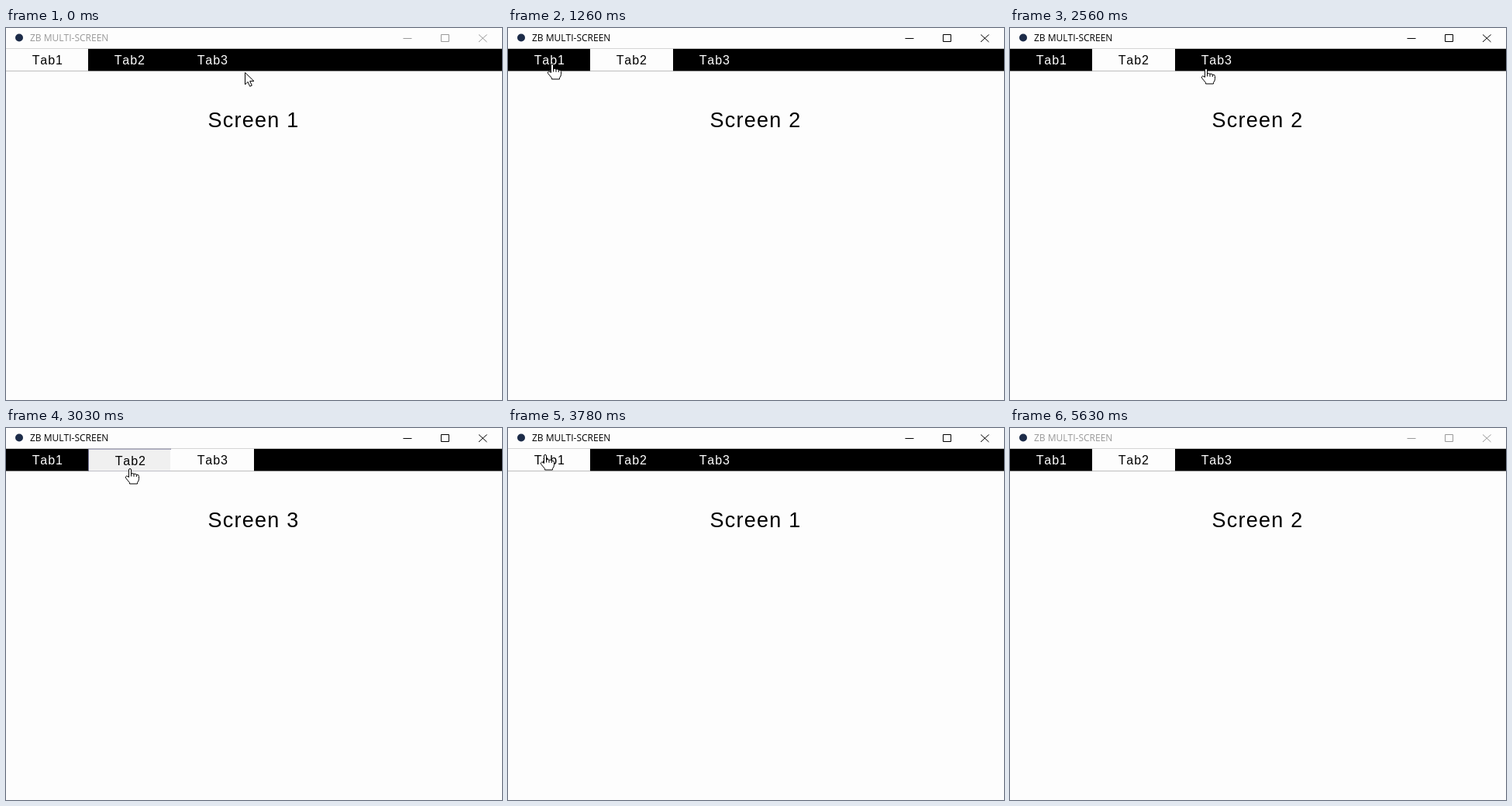
An HTML page with a canvas for the animation above (5700 ms loop, 640 px wide and 480 px high).

```html
<!DOCTYPE html>
<html lang="en">
<head>
<meta charset="utf-8">
<title>Tabbed window</title>
<style>
html, body { margin: 0; width: 100%; height: 100%; overflow: hidden; background: #fdfdfd; }
canvas { display: block; }
</style>
</head>
<body>
<canvas id="stage" width="640" height="480"></canvas>
<script>
const ctx = document.getElementById('stage').getContext('2d');
const LOOP = 5700, FOCUS_ON = 220, FOCUS_OFF = 5600, PRESS = 85;
const PAPER = '#fdfdfd', TAB_W = 320 / 3, BAR_TOP = 26.8, BAR_H = 28.7;
const ARIAL = '"Liberation Sans", Arial, sans-serif';
const UI = '"Open Sans", "Noto Sans", sans-serif';

// Pointer stops: time, x, y. The clicks select whichever tab lies under x.
const clicks = [
  [300, 266, 47], [860, 162, 47], [1390, 55, 47], [1960, 160, 47],
  [2740, 256, 53], [3080, 161, 53], [3650, 38, 35], [4260, 154, 40]
];
const stops = [[0, 308, 57], ...clicks, [4770, 300, 44], [5220, 45, 44], [FOCUS_OFF, 24, -24]];

const arrow = new Path2D('M.5 .5V16L4 12.5L6.7 18.3L9.3 17.2L6.7 11.6H12Z');
const hand = new Path2D('M-2.5 10.5V1Q-2.5 -.5 -1 -.5T.5 1V6Q2.5 4.7 4 6.3Q6 5.5 7.3 7.2' +
  'Q10.5 6.6 10.5 9.5V12.5Q10.5 15 8.5 17.5V19H-1.5V17.5L-6.5 11.5Q-7 9.5 -5.5 9Q-4 9 -2.5 10.5Z');
const knuckles = new Path2D('M.5 6V9.5M4 6.3V9.8M7.3 7.2V10');

const tabAt = x => Math.floor(x / TAB_W) + 1;
const ease = u => u * u * u * (u * (6 * u - 15) + 10);

// Each move takes nine tenths of the gap, then the pointer rests.
function pointerAt(t) {
  const i = stops.findIndex(s => s[0] > t);
  const [t0, x0, y0] = stops[i - 1], [t1, x1, y1] = stops[i];
  const k = ease(Math.min(1, (t - t0) / (t1 - t0) / .9));
  return [x0 + (x1 - x0) * k, y0 + (y1 - y0) * k];
}

function text(str, x, y, size, family, color, spacing = 0) {
  ctx.font = `${size}px ${family}`;
  ctx.letterSpacing = spacing + 'px';
  ctx.fontKerning = 'none';
  ctx.fillStyle = color;
  ctx.fillText(str, x, y);
}

function box(x, y, w, h, color) {
  ctx.fillStyle = color;
  ctx.fillRect(x, y, w, h);
}

function drawTitle(focused) {
  ctx.fillStyle = '#1c2b48';
  ctx.beginPath();
  ctx.arc(17, 12.5, 5, 0, 7);
  ctx.fill();
  text('ZB MULTI-SCREEN', 31, 17, 12, UI, focused ? '#000' : '#999');
  ctx.strokeStyle = focused ? '#000' : '#999';
  ctx.lineWidth = 1;
  ctx.stroke(new Path2D('M512.5 13.5H523.5M561.5 8.5h10v9h-10zM610 8.5l10.5 9.5m0 -9.5l-10.5 9.5'));
}

function drawTabs(active, pressed) {
  box(0, BAR_TOP, 640, BAR_H, '#000');
  for (let n = 1; n <= 3; n++) {
    const x = Math.floor((n - 1) * TAB_W), w = Math.floor(n * TAB_W) - x;
    const down = n === pressed, on = n === active;
    if (on) box(x, BAR_TOP, w, BAR_H, PAPER);
    if (down) {
      box(x, BAR_TOP, w, BAR_H, '#78789a');
      box(x + 1, BAR_TOP + 1, w - 1, BAR_H - 1, PAPER);
      box(x + 1, BAR_TOP + 1, w - 2, BAR_H - 2, '#f0f0f0');
    }
    const shift = down ? 1 : 0;
    text('Tab' + n, x + 33.7 + shift, 47 + shift, 16, ARIAL, on || down ? '#000' : '#fff', .9);
  }
}

function drawPointer(x, y) {
  const overTab = x < 320 && y >= BAR_TOP && y < BAR_TOP + BAR_H;
  const shape = overTab ? hand : arrow;
  ctx.save();
  ctx.translate(Math.round(x), Math.round(y));
  ctx.fillStyle = '#fff';
  ctx.strokeStyle = '#000';
  ctx.lineWidth = 1;
  ctx.fill(shape);
  ctx.stroke(shape);
  if (overTab) ctx.stroke(knuckles);
  ctx.restore();
}

function draw(t) {
  const last = clicks.filter(c => c[0] <= t).pop();
  const held = clicks.find(c => t < c[0] && t >= c[0] - PRESS);
  const active = last ? tabAt(last[1]) : 1;
  box(0, 0, 640, 480, PAPER);
  drawTitle(t >= FOCUS_ON && t < FOCUS_OFF);
  drawTabs(active, held && tabAt(held[1]));
  text('Screen ' + active, 260.5, 128, 27, ARIAL, '#000', 1.25);
  if (t < FOCUS_OFF) drawPointer(...pointerAt(t));
}

const start = performance.now();
function tick() {
  draw((performance.now() - start) % LOOP);
  requestAnimationFrame(tick);
}
tick();
</script>
</body>
</html>
```
